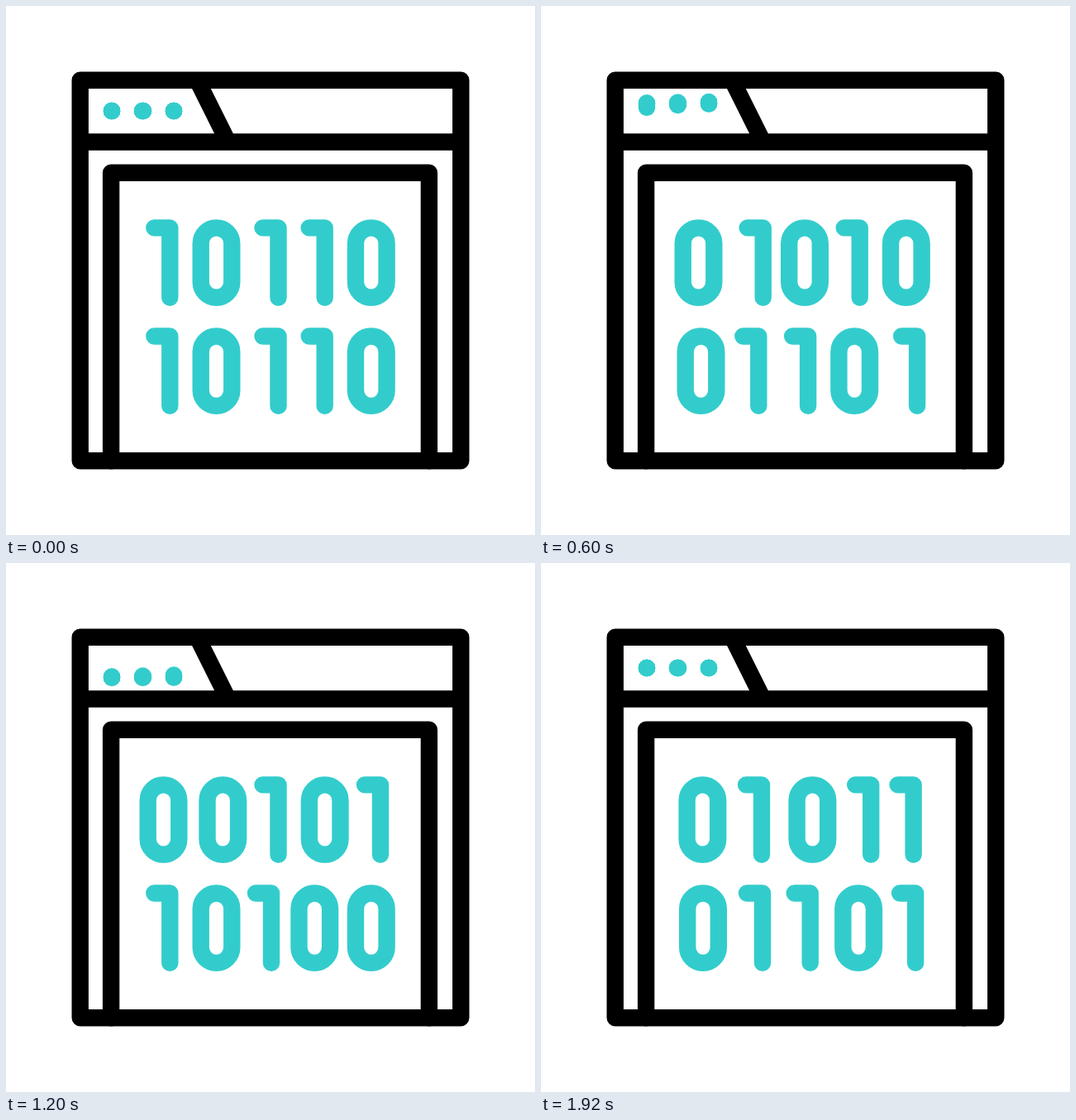
These frames come from a looping animation (640x640 px, 2.4 s). An HTML page without scripts:

```html
<!DOCTYPE html>
<html lang="en">
<head>
<meta charset="utf-8">
<title>Binary window</title>
<style>
html, body { margin: 0; width: 100%; height: 100%; overflow: hidden; background: #fff; }
svg { display: block; width: 100vw; height: 100vh; }
.frame, .code { fill: none; stroke-width: 20.4; stroke-linecap: round; stroke-linejoin: round; }
.frame { stroke: #000; }
.code { stroke: #3cc; }

/* Four digit screens, one after another */
.code g { visibility: hidden; animation: show 2.4s step-end infinite; }
.code g:nth-child(1) { animation-delay: 0s; }
.code g:nth-child(2) { animation-delay: -1.8s; }
.code g:nth-child(3) { animation-delay: -1.2s; }
.code g:nth-child(4) { animation-delay: -.6s; }
@keyframes show {
  0% { visibility: visible; }
  25%, 100% { visibility: hidden; }
}

/* Each dot is a short trail of delayed copies */
.dots { fill: #3cc; }
.dots use { animation: bob 2.4s linear calc(var(--d) + var(--k) - 2.4s) infinite; }
.dots use:nth-child(1) { --k: 0s; }
.dots use:nth-child(2) { --k: .03s; }
.dots use:nth-child(3) { --k: .06s; }
.dots use:nth-child(4) { --k: .09s; }
.dots use:nth-child(5) { --k: .12s; }
.dots use:nth-child(6) { --k: .15s; }
.dots use:nth-child(7) { --k: .18s; }
@keyframes bob {
  0% { transform: translateY(0); }
  1.7% { transform: translateY(-3.5px); }
  3.3% { transform: translateY(-6.9px); }
  5.4% { transform: translateY(-10px); }
  7.5% { transform: translateY(-11.5px); }
  10% { transform: translateY(-12px); }
  12.5% { transform: translateY(-11.6px); }
  15.8% { transform: translateY(-10.4px); }
  17.5% { transform: translateY(-9.6px); }
  21.7% { transform: translateY(-8.6px); }
  23.3% { transform: translateY(-7px); }
  25% { transform: translateY(-4.2px); }
  27.5% { transform: translateY(-1px); }
  30%, 32.1% { transform: translateY(0); }
  32.5% { transform: translateY(.6px); }
  34.2% { transform: translateY(4px); }
  35.8% { transform: translateY(7px); }
  39.2% { transform: translateY(8.5px); }
  41.7% { transform: translateY(10px); }
  43.3% { transform: translateY(11px); }
  46%, 53% { transform: translateY(11.3px); }
  55.8% { transform: translateY(11px); }
  57.5% { transform: translateY(10px); }
  59.2% { transform: translateY(9px); }
  63.3% { transform: translateY(5px); }
  65% { transform: translateY(2.2px); }
  66.7% { transform: translateY(.3px); }
  69%, 100% { transform: translateY(0); }
}
</style>
</head>
<body>
<svg viewBox="0 0 640 640">
  <defs>
    <path id="one" d="M-19 0H0V84.4"/>
    <rect id="zero" x="-18.8" width="37.6" height="84.4" rx="18.8"/>
    <circle id="dot" r="10.2"/>
    <g id="row"><use href="#one" x="198.3"/><use href="#zero" x="254.5"/><use href="#one" x="329.5"/><use href="#one" x="385.7"/><use href="#zero" x="441.8"/></g>
  </defs>

  <g class="dots">
    <g style="--d:0s" transform="translate(128 127)"><use href="#dot"/><use href="#dot"/><use href="#dot"/><use href="#dot"/><use href="#dot"/><use href="#dot"/><use href="#dot"/></g>
    <g style="--d:.04s" transform="translate(165.5 127)"><use href="#dot"/><use href="#dot"/><use href="#dot"/><use href="#dot"/><use href="#dot"/><use href="#dot"/><use href="#dot"/></g>
    <g style="--d:.08s" transform="translate(203 127)"><use href="#dot"/><use href="#dot"/><use href="#dot"/><use href="#dot"/><use href="#dot"/><use href="#dot"/><use href="#dot"/></g>
  </g>

  <g class="frame">
    <path d="M89.7 89.7H550.3V550.3H89.7ZM89.7 164.5H550.3M231.3 89.7L268.6 164.5"/>
    <path d="M127.1 550.3V201.8H511.9V550.3"/>
  </g>

  <g class="code">
    <g>
      <use href="#row" y="268.4"/>
      <use href="#row" y="399.5"/>
    </g>
    <g>
      <use href="#zero" x="190.5" y="268.4"/><use href="#one" x="268.7" y="268.4"/><use href="#zero" x="319" y="268.4"/><use href="#one" x="385.7" y="268.4"/><use href="#zero" x="441.8" y="268.4"/>
      <use href="#zero" x="193.5" y="399.5"/><use href="#one" x="263.3" y="399.5"/><use href="#one" x="323.1" y="399.5"/><use href="#zero" x="379.2" y="399.5"/><use href="#one" x="455.1" y="399.5"/>
    </g>
    <g>
      <use href="#zero" x="190.5" y="268.4"/><use href="#zero" x="262.3" y="268.4"/><use href="#one" x="329.5" y="268.4"/><use href="#zero" x="385.7" y="268.4"/><use href="#one" x="453" y="268.4"/>
      <use href="#one" x="198.3" y="399.5"/><use href="#zero" x="254.5" y="399.5"/><use href="#one" x="321" y="399.5"/><use href="#zero" x="373.3" y="399.5"/><use href="#zero" x="441.8" y="399.5"/>
    </g>
    <g>
      <use href="#zero" x="195.4" y="268.4"/><use href="#one" x="267" y="268.4"/><use href="#zero" x="328.4" y="268.4"/><use href="#one" x="399.2" y="268.4"/><use href="#one" x="450.6" y="268.4"/>
      <use href="#zero" x="196" y="399.5"/><use href="#one" x="268" y="399.5"/><use href="#one" x="325.7" y="399.5"/><use href="#zero" x="384.1" y="399.5"/><use href="#one" x="453.1" y="399.5"/>
    </g>
  </g>
</svg>
</body>
</html>
```
